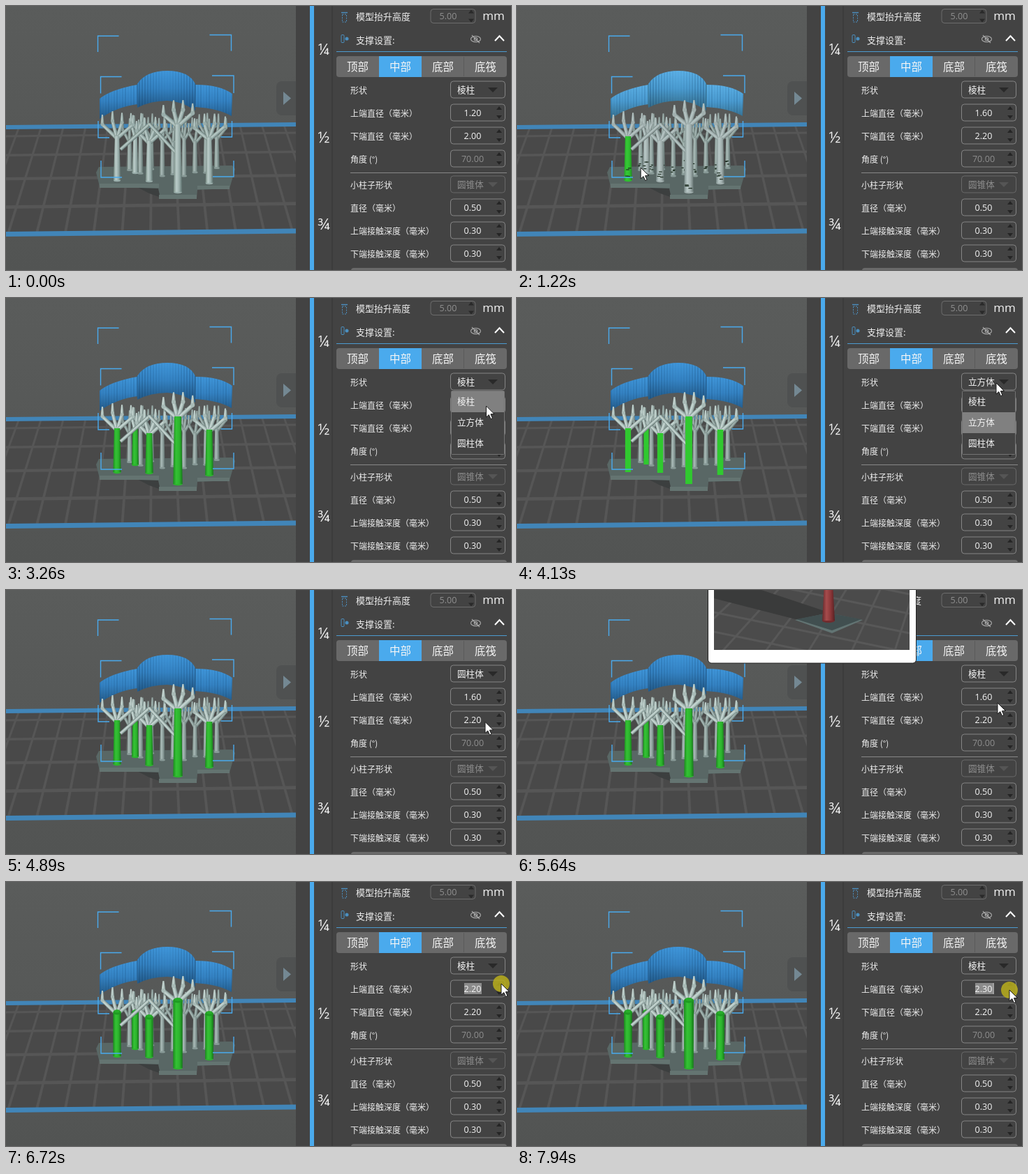
An HTML page with a canvas for the animation above (8000 ms loop, 723 px wide and 379 px high).

```html
<!DOCTYPE html>
<html lang="zh">
<head>
<meta charset="utf-8">
<style>
html,body{margin:0;width:100%;height:100%;overflow:hidden;background:#444}
canvas{display:block}
</style>
</head>
<body>
<canvas id="c" width="723" height="379"></canvas>
<script>
const g = document.getElementById('c').getContext('2d');
const LOOP = 8000;
const CJK = '"Noto Sans CJK SC","Noto Sans CJK",sans-serif';
const LATIN = '"Open Sans","Noto Sans",sans-serif';
const BLUE = '#4aaaed';
const SHAPES = ['棱柱', '立方体', '圆柱体'];
const TABS = ['顶部', '中部', '底部', '底筏'];
const OPEN = [3070, 4130, 5060], CLOSE = [3660, 4680, 5430];
const FIELD = 6380;

function random(seed) {
  return () => (seed = (seed * 16807) % 2147483647) / 2147483647;
}
const within = (t, a, b) => t >= a && t < b;
const mix = (a, b, u) => a + (b - a) * u;

// Tips fan out evenly above the top of the trunk.
function fan(x, top, n, gap, rise, rnd) {
  return Array.from({ length: n }, (_, i) => {
    const off = (i - (n - 1) / 2) * gap;
    return [x + off + rnd() * 3, top - rise + Math.abs(off) * .4 + rnd() * 4];
  });
}
function makeTrees() {
  const rnd = random(77);
  const front = [[159, 250, 187], [185, 239, 187], [205, 251, 194], [246, 267, 170], [291, 254, 189]]
    .map(([x, base, top], i) => ({
      x, base, top, k: 1 + (base - 251) / 90, when: 1000 + i * 380,
      tips: fan(x, top, i === 1 ? 2 : 4, 14, 40, rnd)
    }));
  const back = Array.from({ length: 9 }, (_, i) => {
    const x = 177 + i * 15.6, top = 184 + rnd() * 12;
    return { x, base: 232 + rnd() * 14, top, tips: fan(x, top, 3, 11, 34, rnd) };
  });
  return { front, back };
}
const { front, back } = makeTrees();

// Stops of the pointer: each chosen trunk, then the controls.
const optionY = i => 148 + i * 30;
const path = [
  [260, 232, 281],
  ...front.map(p => [p.when, p.x + 2, 232]),
  [2650, 393, 216], [OPEN[0], 690, 118],
  [3400, 686, optionY(1)], [3990, 686, optionY(1)], [OPEN[1], 686, 122], [4260, 686, 122],
  [4620, 686, optionY(2)], [4820, 686, optionY(2)], [OPEN[2], 686, 120],
  [5360, 686, optionY(0)], [CLOSE[2], 686, optionY(0)],
  [5570, 688, 162], [5640, 688, 162], [6050, 709, 146], [7260, 709, 146], [7530, 705, 155]
];

function poly(pts, fill, stroke, w = 1) {
  g.beginPath();
  pts.forEach((p, i) => i ? g.lineTo(p[0], p[1]) : g.moveTo(p[0], p[1]));
  if (fill) { g.closePath(); g.fillStyle = fill; g.fill(); }
  if (stroke) { g.strokeStyle = stroke; g.lineWidth = w; g.stroke(); }
}
function rect(x, y, w, h, c) { g.fillStyle = c; g.fillRect(x, y, w, h); }
function box(x, y, w, h, r, fill, stroke) {
  g.beginPath();
  g.roundRect(x, y, w, h, r);
  if (fill) { g.fillStyle = fill; g.fill(); }
  if (stroke) { g.strokeStyle = stroke; g.lineWidth = 1; g.stroke(); }
}
function dot(x, y, rx, ry, c) {
  g.fillStyle = c;
  g.beginPath();
  g.ellipse(x, y, rx, ry, 0, 0, 7);
  g.fill();
}
function text(s, x, y, size = 12, c = '#eee', align = 'left', font = CJK) {
  g.font = size + 'px ' + font;
  g.fillStyle = c;
  g.textAlign = align;
  g.textBaseline = 'alphabetic';
  g.fillText(s, x, y + size * .37);
}

// A tapered rod shaded across its width.
function limb(x1, y1, x2, y2, w1, w2, cols) {
  const len = Math.hypot(x2 - x1, y2 - y1) || 1;
  let nx = -(y2 - y1) / len, ny = (x2 - x1) / len;
  if (nx < 0) { nx = -nx; ny = -ny; }
  const r = Math.max(w1, w2) / 2, a = w1 / 2, b = w2 / 2;
  const grad = g.createLinearGradient(x1 - nx * r, y1 - ny * r, x1 + nx * r, y1 + ny * r);
  cols.forEach((c, i) => grad.addColorStop(i / 3, c));
  poly([[x1 - nx * a, y1 - ny * a], [x2 - nx * b, y2 - ny * b],
        [x2 + nx * b, y2 + ny * b], [x1 + nx * a, y1 + ny * a]], grad);
}
function branches({ x, top, tips }, w, cols) {
  for (const [tx, ty] of tips) {
    const jy = ty + 14;
    limb(x, top + 3, tx, jy, w, w * .8, cols);
    limb(tx, jy, tx, ty, w * .9, 2, cols);
    dot(tx, jy, w * .42, w * .42, cols[2]);
  }
  dot(x, top + 1, w * .5, w * .5, cols[2]);
}

function floor() {
  const bg = g.createLinearGradient(0, 0, 0, 379);
  bg.addColorStop(0, '#5a5c5b');
  bg.addColorStop(1, '#525453');
  rect(0, 0, 415, 379, bg);
  g.save();
  g.beginPath();
  g.moveTo(0, 174); g.lineTo(415, 170); g.lineTo(415, 323); g.lineTo(0, 327);
  g.clip();
  rect(0, 160, 415, 170, '#494949');
  for (let x = -121; x < 560; x += 41) {
    const far = mix(215, x, .76);
    poly([[far - 1.5, 165], [far + 1.5, 165], [x + 2, 330], [x - 2, 330]], '#565656');
  }
  for (let i = 0; i < 4; i++) {
    const y = 187 + i * 24 + i * i * 3.3;
    poly([[0, y], [415, y - 5]], null, '#565656', 3 + i * .6);
  }
  g.restore();
  poly([[0, 174], [415, 170]], null, '#4185b8', 6);
  poly([[0, 327.5], [415, 323]], null, '#4185b8', 7);
}

function raft() {
  poly([[186, 259], [222, 258], [219, 274], [205, 269]], '#3c3f3f');
  poly([[133, 231], [324, 229], [328, 234], [320, 262], [274, 264],
        [273, 276], [221, 276], [218, 262], [134, 259], [129, 239]], '#596765');
  for (const [x, y, w, h] of [[134, 255, 85, 6], [219, 271, 54, 6], [274, 258, 46, 5]])
    rect(x, y, w, h, '#647471');
}

function model(light) {
  const hi = light ? '#5bb0e6' : '#3f96da';
  const mid = light ? '#4a9bd0' : '#3482c2';
  const lo = light ? '#37718f' : '#245d8c';
  const wings = new Path2D('M134 133Q150 120 188 113V141Q158 145 134 162Z' +
    'M271 113Q306 113 324 126L323 158Q304 147 271 145Z');
  const bulge = new Path2D('M188 112Q200 93 231 93Q262 93 271 112V150Q250 136 231 136Q207 136 188 146Z');
  const slab = (shape, y1, y2, stripes) => {
    const grad = g.createLinearGradient(0, y1, 0, y2);
    [hi, mid, lo].forEach((c, i) => grad.addColorStop(i / 2, c));
    g.save();
    g.clip(shape);
    rect(130, 90, 200, 75, grad);
    for (let x = 134; x < 326; x += 4) rect(x, 90, 2, 75, `rgba(16,58,100,${stripes(x)})`);
    g.restore();
  };
  slab(wings, 113, 160, x => .06 + (x % 3) * .05);
  slab(bulge, 93, 144, x => .02 + Math.abs(x - 229) / 160);
  for (const x of [188, 271]) poly([[x, 112], [x, 143]], null, lo);
}

// Corner of the bounding box: dx and dy give the direction of its arms.
function corner(x, y, dx, dy) {
  poly([[x + dx, y], [x, y], [x, y + dy]], null, BLUE, 1.4);
}

function flecks({ x, base }, w, rnd) {
  for (let i = 0; i < 4; i++)
    rect(x - w / 2 + rnd() * w * .5, base - 6 - i * 5 * rnd(), w * .4, 1.2, '#1c2c1f');
}
function trees(s) {
  const rnd = random(19);
  const grey = s.light ? ['#7d8d8b', '#b9c8c7', '#a2b0af', '#667472']
    : s.picked ? ['#778a86', '#cbdbd7', '#a9bbb7', '#637672']
    : ['#73877f', '#bbccc9', '#9aaeab', '#5d706d'];
  const dim = ['#65766f', '#a9bab7', '#889a97', '#505f5d'];
  const green = s.light ? ['#24a325', '#36c936', '#2fbd2f', '#1d8c20']
    : s.shape === 1 ? Array(4).fill('#30c92f')
    : ['#1b8a1e', '#35c235', '#2cb42d', '#16771a'];
  for (const p of back) {
    branches(p, 5, dim);
    limb(p.x, p.top, p.x, p.base, 5, 8, dim);
    dot(p.x, p.base, 4, 1.5, dim[2]);
    if (s.light) flecks(p, 8, rnd);
  }
  for (const p of [...front].sort((a, b) => a.base - b.base)) {
    const { x, base, top, k } = p, on = s.t >= p.when, square = s.shape === 1;
    const cols = on ? green : grey;
    const w1 = s.top * 5.2 * k, w2 = square ? w1 : s.bottom * 5.2 * k;
    if (p === front[3]) {
      limb(164, 206, 206, 169, 5, 5, grey);
      limb(205, 169, 243, 210, 5, 5, grey);
    }
    branches(p, 6 * k, grey);
    if (!square) dot(x, base, w2 / 2, 2.2, cols[2]);
    limb(x, top, x, base, w1, w2, cols);
    if (on && !s.light && s.top > 1.9) {
      dot(x, top, w1 / 2, s.top * 1.6, '#1f9a22');
      dot(x, top - 1.5, w1 / 3, s.top, '#27ad29');
    }
    if (s.light) flecks(p, w2, rnd);
  }
}

function arrows(x, y, c) {
  for (const d of [-1, 1]) poly([[x - 4, y + d * 4], [x, y + d * 9], [x + 4, y + d * 4]], c);
}
function spin(y, val, off, sel, caret) {
  box(636.5, y - 12, 78, 24, 4, '#434343', '#858585');
  if (sel) rect(656, y - 8, 25, 16, '#8b8b8b');
  text(val, 668, y, 12.6, off ? '#8e8e8e' : '#f4f4f4', 'center', LATIN);
  if (caret) rect(681.5, y - 8, 1, 16, '#fff');
  arrows(706, y, '#252525');
}
function combo(y, val, off) {
  box(636.5, y - 12, 78, 24, 4, '#434343', off ? '#686868' : '#858585');
  text(val, 646, y, 12.6, off ? '#8e8e8e' : '#f4f4f4');
  poly([[690, y - 3], [704, y - 3], [697, y + 4]], off ? '#555' : '#292929');
}

function header() {
  g.setLineDash([2, 1.5]);
  box(481.5, 12, 6, 11, 0, null, '#4b8fc0');
  g.setLineDash([]);
  poly([[480, 9.5], [489, 9.5]], null, '#4b8fc0', 1.4);
  text('模型抬升高度', 501, 15, 13);
  box(608, 4.5, 64, 20, 4, null, '#6d6d6d');
  text('5.00', 633, 14.5, 12.6, '#909090', 'center', LATIN);
  arrows(666, 14.5, '#292929');
  text('mm', 698, 14, 17, '#f4f4f4', 'center', LATIN);

  box(480, 41.5, 4, 11, 1, null, '#4b8fc0');
  dot(488, 47, 2.5, 2.5, '#4b8fc0');
  text('支撑设置:', 501, 49.5, 13);
  g.strokeStyle = '#aaa';
  g.lineWidth = 1.1;
  g.beginPath();
  g.ellipse(672.5, 47.5, 7, 4.2, 0, 0, 7);
  g.moveTo(675, 47.5);
  g.arc(672.5, 47.5, 2.2, 0, 7);
  g.moveTo(667, 42); g.lineTo(678, 53);
  g.stroke();
  poly([[700, 50], [706.5, 43], [713, 50]], null, '#fff', 2);
  rect(473, 65, 244, 1, '#4c9bd0');
}

function panel(s) {
  rect(415, 0, 308, 379, '#434343');
  rect(435, 0, 6, 379, BLUE);
  rect(466, 0, 2, 379, '#3c3c3c');
  ['¼', '½', '¾'].forEach((c, i) => text(c, 455, 62 + i * 125.5, 22, '#f0f0f0', 'center', LATIN));
  header();

  box(473, 72, 244, 30, 4, '#696969');
  rect(534, 72, 61, 30, BLUE);
  rect(655, 73, 1, 28, '#5a5a5a');
  TABS.forEach((n, i) => text(n, 503.5 + i * 61, 87.5, 15.5, '#f6f6f6', 'center'));

  ['形状', '上端直径（毫米）', '下端直径（毫米）', '角度 (°)']
    .forEach((n, i) => text(n, 493, 122 + i * 33));
  ['小柱子形状', '直径（毫米）', '上端接触深度（毫米）', '下端接触深度（毫米）']
    .forEach((n, i) => text(n, 493, 258 + i * 33));
  rect(493, 239, 224, 1, '#888');
  combo(120, SHAPES[s.shape]);
  spin(153, s.top.toFixed(2), false, s.t >= FIELD, s.caret);
  spin(186, s.bottom.toFixed(2));
  spin(219, '70.00', true);
  combo(256, '圆锥体', true);
  ['0.50', '0.30', '0.30'].forEach((v, i) => spin(289 + i * 33, v));
  box(494, 376, 223, 8, 4, '#6a6a6a');

  if (s.open) {
    box(637.5, 133.5, 76, 91, 1, '#434343', '#737373');
    rect(638, optionY(s.hover) - 14, 75, 30, '#808080');
    SHAPES.forEach((n, i) => text(n, 646, optionY(i) + .5, 12.6, '#f4f4f4'));
  }
}

function popup() {
  box(273.5, -8, 298, 113, 5, '#fff', '#222');
  g.save();
  g.beginPath();
  g.rect(282, 0, 280, 86);
  g.clip();
  rect(282, 0, 280, 86, '#4b4b4b');
  for (let i = -3; i < 9; i++) {
    poly([[230 + i * 62, 90], [330 + i * 48, -5]], null, '#585858', 3);
    poly([[282, i * 28 - 24], [562, i * 28 + 34]], null, '#585858', 3);
  }
  poly([[282, 0], [350, 0], [440, 30], [430, 50], [282, 12]], '#3a3b3b');
  poly([[398, 43], [446, 33], [495, 43], [451, 62]], '#627473');
  poly([[400, 42], [446, 33], [493, 42], [451, 58]], '#414f50');
  dot(446, 44, 9, 3, '#712c2e');
  limb(446, -2, 446, 44, 13, 18, ['#66282a', '#a64c4d', '#8c3739', '#582022']);
  g.restore();
}

function pointer(t) {
  if (t < path[0][0]) return;
  const next = path.findIndex(p => p[0] > t);
  const b = path.at(next), a = next < 0 ? b : path[next - 1];
  const v = next < 0 ? 1 : (t - a[0]) / (b[0] - a[0]), u = v * v * (3 - 2 * v);
  if (within(t, FIELD, 7130) || t >= 7800)
    dot(mix(a[1], b[1], u), mix(a[2], b[2], u), 12, 12, 'rgba(184,174,28,.85)');
  g.save();
  g.translate(mix(a[1], b[1], u), mix(a[2], b[2], u));
  const arrow = new Path2D('M0 0V16L3.8 12.6L6.5 18.6L9 17.5L6.4 11.7L11.5 11.5Z');
  g.fillStyle = '#fff';
  g.fill(arrow);
  g.strokeStyle = '#1a1a1a';
  g.lineWidth = 1;
  g.stroke(arrow);
  g.restore();
}

function topSize(t) {
  if (t < FIELD) return t < 300 ? 1.2 : 1.6;
  if (t >= 7870) return 2.3;
  return Math.min(2.4, 1.7 + .1 * Math.floor((t - FIELD) / 68));
}
function state(t) {
  const closed = CLOSE.filter(c => t >= c).length;
  const shape = closed % 3;
  const aim = (shape + 1) % 3;
  return {
    t, shape,
    light: within(t, 300, 2720),
    picked: t >= 2720,
    top: topSize(t),
    bottom: t < 1080 ? 2 : 2.2,
    open: t >= OPEN[closed],
    hover: t < OPEN[closed] + 240 ? shape : aim,
    caret: within(t, 7260, 7530) || t >= 7800
  };
}

function draw(t) {
  const s = state(t);
  floor();
  raft();
  corner(131.5, 43, 30, 23);
  corner(322.5, 41.5, -31, 23);
  corner(135.5, 101.5, 30, 24);
  corner(326, 100, -31, 25);
  model(s.light);
  trees(s);
  corner(132, 189, 16, -24);
  corner(323.5, 188, -16, -23);
  corner(136, 246, 30, -24);
  corner(326, 245, -30, -23);
  box(387, 108, 32, 49, [8, 0, 0, 8], '#4f5151');
  poly([[397, 123], [397, 142], [408, 132.5]], '#748893');
  panel(s);
  if (within(t, 5640, FIELD)) popup();
  pointer(t);
}

const start = performance.now();
function tick(now) {
  draw(Math.max(0, now - start) % LOOP);
  requestAnimationFrame(tick);
}
draw(0);
requestAnimationFrame(tick);
</script>
</body>
</html>
```
